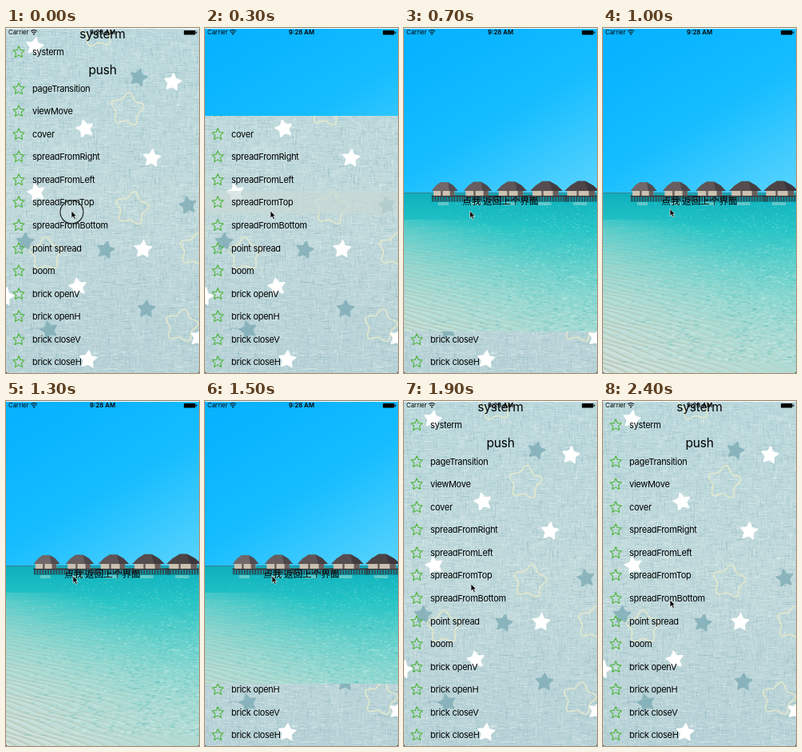
Write an HTML page with a canvas that moves like this. It is 242x432 px and loops after 2500 ms.

```html
<!DOCTYPE html>
<html lang="en">
<head>
<meta charset="utf-8">
<title>Spread from top</title>
<style>
  html, body { margin: 0; width: 100%; height: 100%; overflow: hidden; background: #111; }
  #stage { position: relative; width: 242px; height: 432px; overflow: hidden; border-radius: 0 0 3px 3px; background: #bfd7da;
    font: 11px/14px Inter, "Liberation Sans", sans-serif; letter-spacing: -.28px; color: #000; }
  #stage > *, #photo > * { position: absolute; left: 0; top: 0; }
  canvas { width: 242px; height: 432px; }
  #list div { position: absolute; left: 33px; white-space: nowrap; }
  #list .head { left: 0; width: 242px; text-align: center; font-size: 15.5px; line-height: 20px; letter-spacing: -.2px; }
  #list svg { position: absolute; left: -26.5px; top: -2px; overflow: visible; }
  #stage #band { top: 204px; width: 242px; height: 29px; background: rgba(200, 217, 214, .66); }
  #photo { width: 242px; overflow: hidden; }
  #photo p { margin: 0; top: 208px; width: 242px; text-align: center; white-space: nowrap;
    font: 11.6px/16px "Noto Sans CJK SC", "Noto Sans CJK", sans-serif; letter-spacing: 0; }
  #bar { width: 242px; height: 12px; font-size: 7.8px; line-height: 11px; letter-spacing: 0; box-shadow: inset 0 1px #fff; }
  #bar span { position: absolute; left: 3px; }
  #bar b { position: absolute; width: 242px; text-align: center; font-weight: 600; }
  #bar svg { position: absolute; left: 0; top: 0; }
</style>
</head>
<body>
<div id="stage">
  <canvas id="fabric"></canvas>
  <div id="band"></div>
  <div id="list"></div>
  <div id="photo"><canvas id="sea"></canvas><p>点我 返回上个界面</p></div>
  <div id="bar">
    <span>Carrier</span><b>9:28 AM</b>
    <svg width="242" height="12">
      <path d="M31 4.2Q35 .8 39 4.2M32.6 6Q35 4 37.4 6" fill="none" stroke="#111" stroke-width="1.1"/>
      <path d="M33.8 7.2Q35 6.3 36.2 7.2L35 8.7Z"/>
      <rect x="223" y="3" width="14.5" height="5.5" rx="1"/>
      <rect x="238.2" y="4.6" width="1.2" height="2.2"/>
    </svg>
  </div>
  <svg width="242" height="432">
    <circle id="tap" r="14.5" cx="82.5" cy="230.5" fill="none" stroke="#151b1b" stroke-width="1.1"/>
    <path id="arrow" d="M0 0V9L2.1 7.1L3.7 10.6L5.3 9.8L3.8 6.5H6.4Z" fill="#050505" stroke="#e8f0f0" stroke-width=".7"/>
  </svg>
</div>
<script>
const W = 242, H = 432, LOOP = 2500, STEP = 100;
const $ = id => document.getElementById(id);

let seed = 7;
const rand = () => (seed = (seed * 16807) % 2147483647) / 2147483647;

function canvas(id) {
  const c = $(id), k = window.devicePixelRatio || 1;
  c.width = W * k;
  c.height = H * k;
  const g = c.getContext('2d');
  g.scale(k, k);
  return g;
}

function starPoints(x, y, r, turn, inner) {
  return Array.from({ length: 10 }, (_, i) => {
    const a = turn - Math.PI / 2 + i * Math.PI / 5, d = i % 2 ? r * inner : r;
    return [x + d * Math.cos(a), y + d * Math.sin(a)];
  });
}

function shape(g, points, color) {
  g.beginPath();
  points.forEach(p => g.lineTo(...p));
  g.closePath();
  g.fillStyle = color;
  g.fill();
}

// closed outline with softened corners
function softLine(g, points, radius) {
  const n = points.length;
  g.beginPath();
  g.moveTo((points[0][0] + points[n - 1][0]) / 2, (points[0][1] + points[n - 1][1]) / 2);
  points.forEach((p, i) => {
    const q = points[(i + 1) % n];
    g.arcTo(...p, (p[0] + q[0]) / 2, (p[1] + q[1]) / 2, radius);
  });
  g.closePath();
}

function gradient(g, from, to, ...colors) {
  const f = g.createLinearGradient(...from, ...to);
  colors.forEach((c, i) => f.addColorStop(i / (colors.length - 1), c));
  return f;
}

function drawFabric() {
  const g = canvas('fabric');
  g.fillStyle = gradient(g, [0, 0], [0, H], '#bad8dc', '#c1d9db', '#b7d2d7');
  g.fillRect(0, 0, W, H);
  // woven threads
  for (let i = 0; i < 9000; i++) {
    const across = rand() < .6, len = 2 + rand() * 9;
    g.fillStyle = rand() < .5 ? 'rgba(232,240,239,.24)' : 'rgba(120,168,180,.17)';
    g.fillRect(Math.floor(rand() * (W + 8)) - 8, Math.floor(rand() * H), across ? len : 1, across ? 1 : len);
  }
  const scatter = (places, r, inner, round, paint) => places.forEach(([x, y]) => {
    softLine(g, starPoints(x, y, r, .25 * Math.sin(x + y), inner), round);
    paint();
  });
  const fill = color => () => { g.fillStyle = color; g.fill(); };
  const outline = () => { g.strokeStyle = 'rgba(234,235,200,.85)'; g.lineWidth = 1.6; g.stroke(); };
  scatter([[166, 62], [125, 278], [176, 352], [24, 268], [228, 222], [54, 378]], 13, .5, 1, fill('rgba(118,166,178,.72)'));
  scatter([[115, 4], [152, 102], [158, 226], [50, 283], [220, 373], [238, 278]], 25, .56, 4, outline);
  scatter([[36, 23], [209, 68], [99, 126], [183, 163], [38, 206], [172, 277], [90, 324], [103, 415], [-1, 336], [242, 388]],
    13, .5, 1, fill('#fff'));
}

function drawHut(g, i) {
  const x = 51 + 41 * i + i * i / 2, half = 16.5 + 1.3 * i, top = 193 - i * .4;
  const shade = 112 - i * 9;
  g.fillStyle = 'rgba(12,98,112,.45)';
  g.fillRect(x - half, 212, half * 2 + 7, 6);
  g.fillStyle = 'rgba(205,226,215,.4)';
  g.fillRect(x - half * .5, 218, half * .8, 4);
  g.fillStyle = '#39383d';
  g.fillRect(x - half, 209.5, half * 2 + 8, 2);
  for (let s = x - half + 1; s < x + half + 7; s += 3.4) g.fillRect(s, 211, 1.2, 6);
  g.fillStyle = '#cbc1b1';
  g.fillRect(x - half * .85, 201, half * 1.6, 9);
  g.fillStyle = '#685f5c';
  g.fillRect(x - half * .3, 204, 2.5, 6);
  g.fillRect(x + half * .4, 204, half * .35, 6);
  shape(g, [[x - 5, top], [x + 4, top], [x + half * .65, 197], [x + half, 204], [x - half, 204], [x - half * .65, 197]],
    `rgb(${shade},${shade - 8},${shade - 6})`);
  shape(g, [[x + 4, top], [x + half * .65, 197], [x + half, 204], [x + half * .35, 204]], 'rgba(38,34,44,.4)');
}

function drawSea() {
  const g = canvas('sea');
  g.fillStyle = gradient(g, [60, 0], [190, 225], '#07b2ff', '#15bdff', '#55d2fd');
  g.fillRect(0, 0, W, 207);
  g.fillStyle = gradient(g, [0, 207], [0, H], '#0fb0be', '#25c5c6', '#5fd0cb', '#8ad8d1', '#a5dad3', '#add9d2');
  g.fillRect(0, 207, W, H - 207);
  g.fillStyle = gradient(g, [30, 432], [140, 262], 'rgba(205,221,217,.85)', 'rgba(185,220,213,.5)', 'rgba(150,215,208,0)');
  g.fillRect(0, 240, W, H - 240);

  // sand ridges, wider toward the viewer
  for (let i = 0; i < 46; i++) {
    const near = i / 46, y0 = 248 + i * 3 + i * i * .06;
    const ridge = (shift, width, rgb, alpha) => {
      g.strokeStyle = gradient(g, [0, 0], [W, 0], `rgba(${rgb},${alpha})`, `rgba(${rgb},${alpha * .7})`, `rgba(${rgb},${alpha * .25})`);
      g.lineWidth = width;
      g.beginPath();
      for (let x = -4; x <= W; x += 4) {
        g.lineTo(x, y0 + shift + (x - 90) * .48 * near + Math.sin(x * .09 + i * 1.7) * (.5 + near));
      }
      g.stroke();
    };
    ridge(0, .8 + near * 1.8, '181,191,167', .15 + near * .45);
    ridge(2 + near, .7 + near, '232,244,240', .12 + near * .3);
  }
  for (let i = 0; i < 1800; i++) {
    const d = rand();
    g.fillStyle = rand() < .5 ? 'rgba(222,248,242,.27)' : 'rgba(16,158,166,.17)';
    g.fillRect(W * Math.sqrt(rand()), 218 + d * 200, 1.5 + d * 4, .8 + d * .5);
  }
  g.fillStyle = '#2e8b9d';
  g.fillRect(0, 206, W, 1.3);
  for (let i = 0; i < 5; i++) drawHut(g, i);
}

function buildList() {
  const points = starPoints(9, 9.3, 7.6, 0, .47).map(p => p.map(n => n.toFixed(2))).join(' ');
  const icon = `<svg width="18" height="18"><polygon points="${points}"
    fill="none" stroke="#4fb63a" stroke-width="1.1" stroke-linejoin="round"/></svg>`;
  const row = (text, y) => `<div style="top:${y - 7}px">${icon}${text}</div>`;
  const head = (text, y) => `<div class="head" style="top:${y - 10}px">${text}</div>`;
  const names = ['pageTransition', 'viewMove', 'cover', 'spreadFromRight', 'spreadFromLeft', 'spreadFromTop',
    'spreadFromBottom', 'point spread', 'boom', 'brick openV', 'brick openH', 'brick closeV', 'brick closeH'];
  $('list').innerHTML = head('systerm', 8) + row('systerm', 30) + head('push', 53) +
    names.map((n, i) => row(n, 75.5 + i * 28.58)).join('');
}

const ramp = (t, from, to) => Math.min(1, Math.max(0, (t - from) / (to - from)));
const ease = p => (1 - Math.cos(Math.PI * p)) / 2;

function show(now) {
  const t = Math.floor((now % LOOP) / STEP) * STEP;
  const open = ramp(t, 137, 777) - ease(ramp(t, 1352, 1882));
  const x = 82 + 2 * ramp(t, 600, 1000);
  const y = 229 - 10 * ramp(t, 900, 1300) + 30 * ramp(t, 1700, 2300);
  $('photo').style.height = Math.round(H * open) + 'px';
  $('band').style.visibility = t >= 100 && t < 1000 ? 'visible' : 'hidden';
  $('tap').style.visibility = t < 100 ? 'visible' : 'hidden';
  $('arrow').setAttribute('transform', `translate(${x} ${y})`);
}

drawFabric();
drawSea();
buildList();
const start = performance.now();
function tick() {
  show(performance.now() - start);
  requestAnimationFrame(tick);
}
tick();
</script>
</body>
</html>
```
